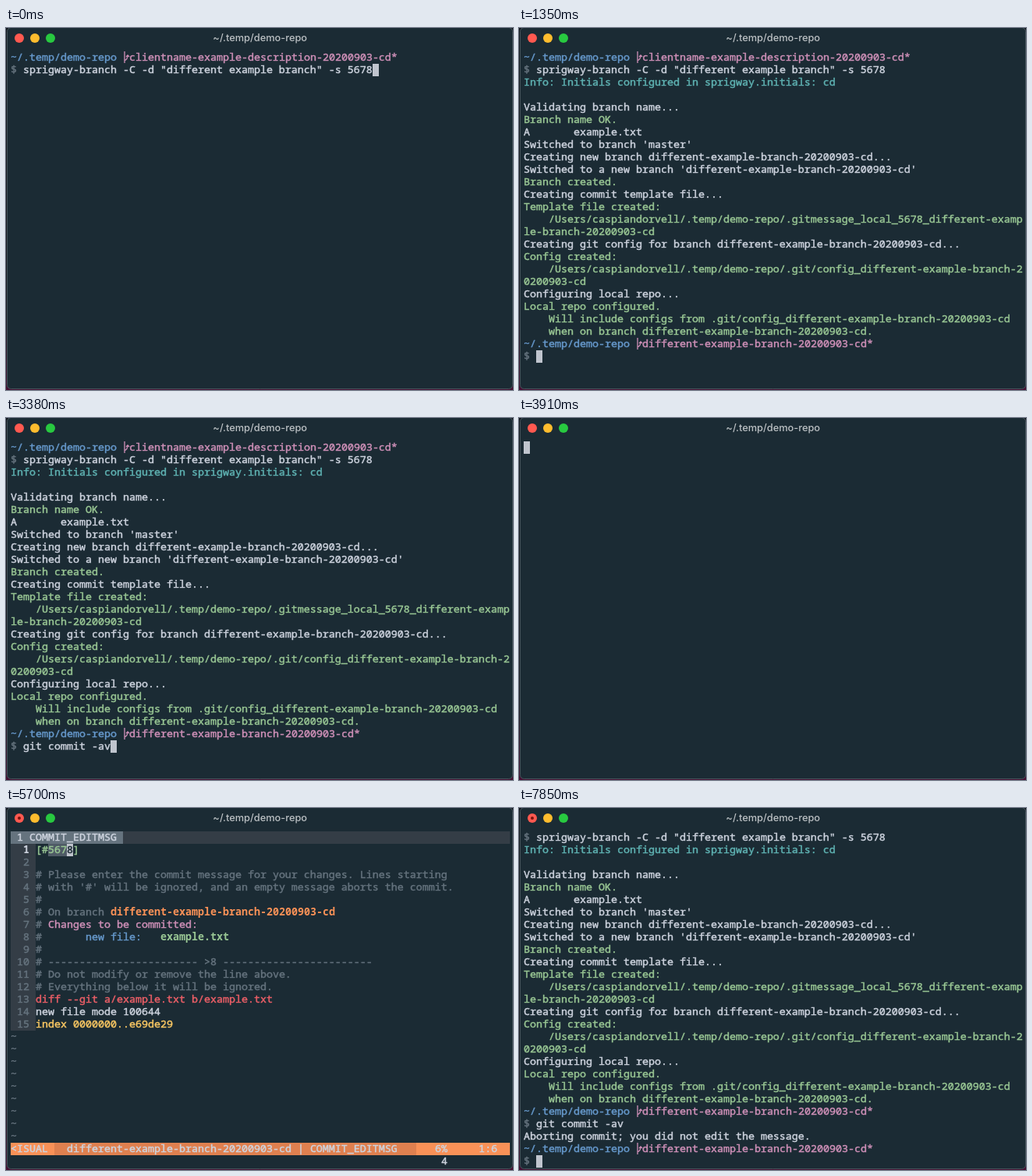
An HTML page with a canvas that plays this animation: 650x465 px, repeating every 8 s.

```html
<!DOCTYPE html>
<html lang="en">
<head>
<meta charset="utf-8">
<title>Terminal</title>
<style>
html, body { margin: 0; width: 100%; height: 100%; overflow: hidden; background: #1b2b34; }
canvas { display: block; }
</style>
</head>
<body>
<canvas id="stage" width="650" height="465"></canvas>
<script>
const ctx = document.getElementById('stage').getContext('2d');
const LOOP = 8000, CELL = 8, ROW = 16, LEFT = 6, TOP = 30;
const BG = '#1b2b34', PANEL = '#343d46', CURSOR = '#c0c5ce';

// Text carries ^x colour codes; a capital letter means bold.
const COLORS = {
  w: '#cdd3de', d: '#65737e', g: '#99c794', c: '#5fb3b3', b: '#6699cc',
  m: '#cf90b8', r: '#ec5f67', o: '#f99157', y: '#fac863', k: BG
};

const branch = 'different-example-branch-20200903-cd';
const home = '/Users/caspiandorvell/.temp/demo-repo/';
const prompt = name => '^b~/.temp/demo-repo ^*' + name + '*';

const output = [
  prompt('clientname-example-description-20200903-cd'),
  '^d$ ^wsprigway-branch -C -d "different example branch" -s 5678',
  '^cInfo: Initials configured in sprigway.initials: cd',
  '',
  'Validating branch name...',
  '^gBranch name OK.',
  'A       example.txt',
  "Switched to branch 'master'",
  `Creating new branch ${branch}...`,
  `Switched to a new branch '${branch}'`,
  '^gBranch created.',
  'Creating commit template file...',
  '^gTemplate file created:',
  `^g    ${home}.gitmessage_local_5678_different-examp`,
  '^gle-branch-20200903-cd',
  `Creating git config for branch ${branch}...`,
  '^gConfig created:',
  `^g    ${home}.git/config_different-example-branch-2`,
  '^g0200903-cd',
  'Configuring local repo...',
  '^gLocal repo configured.',
  `^g    Will include configs from .git/config_${branch}`,
  `^g    when on branch ${branch}.`,
  prompt(branch)
];

const dashes = '-'.repeat(24);
const message = [
  '^g[#5678]',
  '',
  '^d# Please enter the commit message for your changes. Lines starting',
  "^d# with '#' will be ignored, and an empty message aborts the commit.",
  '^d#',
  '^d# On branch ^O' + branch,
  '^d# ^mChanges to be committed:',
  '^d#       ^bnew file:   ^Gexample.txt',
  '^d#',
  `^d# ${dashes} >8 ${dashes}`,
  '^d# Do not modify or remove the line above.',
  '^d# Everything below it will be ignored.',
  '^rdiff --git a/example.txt b/example.txt',
  'new file mode 100644',
  '^yindex 0000000..e69de29'
];

function fill(row, col, cols, color, rows = 1) {
  ctx.fillStyle = color;
  ctx.fillRect(LEFT + col * CELL, TOP + row * ROW, cols * CELL, rows * ROW);
}

function branchIcon(row, col) {
  const x = LEFT + col * CELL, y = TOP + row * ROW;
  ctx.strokeStyle = COLORS.m;
  ctx.lineWidth = 1.3;
  ctx.beginPath();
  ctx.moveTo(x + 2, y);
  ctx.lineTo(x + 2, y + 15);
  ctx.moveTo(x + 2, y + 12);
  ctx.quadraticCurveTo(x + 6, y + 10, x + 6, y + 5);
  ctx.moveTo(x + 4, y + 7);
  ctx.lineTo(x + 6, y + 5);
  ctx.lineTo(x + 8, y + 7);
  ctx.stroke();
}

function put(row, col, text) {
  ctx.textAlign = 'left';
  for (const part of (text[0] === '^' ? text : '^w' + text).split('^').slice(1)) {
    let code = part[0];
    const run = part.slice(1);
    if (code === '*') {
      branchIcon(row, col++);
      code = 'm';
    }
    const bold = code !== code.toLowerCase();
    const x = LEFT + col * CELL, y = TOP + row * ROW + 12;
    ctx.font = `${bold ? 700 : 400} 13.3333px "Noto Sans Mono", "DejaVu Sans Mono", monospace`;
    ctx.fillStyle = ctx.strokeStyle = COLORS[code.toLowerCase()];
    ctx.fillText(run, x, y);
    if (!bold) {
      // A hairline outline gives a medium weight.
      ctx.lineWidth = 0.45;
      ctx.strokeText(run, x, y);
    }
    col += run.length;
  }
}

function cursor(row, col, char = '') {
  fill(row, col, 1, CURSOR);
  put(row, col, '^k' + char);
}

function disc(x, y, r, color) {
  ctx.fillStyle = color;
  ctx.beginPath();
  ctx.arc(x, y, r, 0, Math.PI * 2);
  ctx.fill();
}

function drawWindow(edited) {
  const edge = ctx.createLinearGradient(0, 0, 0, 465);
  edge.addColorStop(0, '#10161d');
  edge.addColorStop(0.8, '#16161f');
  edge.addColorStop(1, '#451033');
  ctx.fillStyle = edge;
  ctx.fillRect(0, 0, 650, 465);

  ctx.beginPath();
  ctx.roundRect(1.5, -0.5, 648, 464, 5);
  ctx.fillStyle = BG;
  ctx.fill();
  ctx.strokeStyle = '#46545b';
  ctx.lineWidth = 1;
  ctx.stroke();

  ['#ff5950', '#fdbc2e', '#28c940'].forEach((color, i) => disc(17 + i * 20, 13, 6, color));
  if (edited) disc(17, 13, 2, '#7d130d');

  ctx.font = '500 12.8px Inter, Roboto, sans-serif';
  ctx.textAlign = 'center';
  ctx.fillStyle = '#bcc1c4';
  ctx.fillText('~/.temp/demo-repo', 325.7, 17);
}

// Number of keys pressed when n presses are spread evenly from start to end.
function keys(t, start, end, n) {
  return t < start ? 0 : Math.min(n, 1 + Math.floor((t - start) * (n - 1) / (end - start)));
}

function drawShell(t) {
  const stages = [2, 6, 11, 15, 24];
  const stage = keys(t, 990, 1350, 5);
  const shown = stage ? stages[stage - 1] : 2;
  output.slice(0, shown).forEach((line, i) => put(i, 0, line));
  if (!stage) return cursor(1, 58);
  if (stage < 5) return cursor(shown, 0);

  const typed = keys(t, 2160, 2600, 6) + keys(t, 2770, 3110, 5) +
    (t >= 3290 ? 2 : 0) + (t >= 3380 ? 1 : 0);
  put(24, 0, '^d$ ^w' + 'git commit -av'.slice(0, typed));
  cursor(24, 2 + typed);
}

function drawAborted() {
  const lines = output.slice(1).concat(
    '^d$ ^wgit commit -av',
    'Aborting commit; you did not edit the message.',
    prompt(branch),
    '^d$'
  );
  lines.forEach((line, i) => put(i, 0, line));
  cursor(26, 2);
}

function drawEditor(t) {
  const visual = t >= 5520 && t < 6510;
  const command = t >= 7040;
  const column = t < 5070 ? 1 : t < 5250 ? 2 : t < 5700 ? 3 : 6;

  fill(0, 0, 80, PANEL);
  fill(0, 0, 18, '#65737e');
  put(0, 1, '1 COMMIT_EDITMSG');

  fill(1, 0, 4, PANEL, message.length);
  if (visual) fill(1, 6, column - 2, '#4f5b66');
  else fill(1, 4, 76, PANEL);
  message.forEach((line, i) => {
    put(i + 1, 0, (i ? '^d' : '^W') + String(i + 1).padStart(3));
    put(i + 1, 4, line);
  });
  for (let row = 16; row < 25; row++) put(row, 0, '^d~');

  const [bright, dark] = visual ? ['#f99157', '#df804f'] : ['#6699cc', '#5a88b7'];
  const mode = visual ? '<ISUAL' : command ? '<MMAND' : '<ORMAL';
  fill(25, 0, 80, bright);
  fill(25, 7, 58, dark);
  put(25, 0, mode);
  put(25, 9, branch + ' | COMMIT_EDITMSG');
  put(25, 68, '6%');
  put(25, 75, '1:' + column);

  if (visual) put(26, 69, String(column - 2));
  if (command) {
    const typed = ':' + (t >= 7220 ? 'q' : '') + (t >= 7490 ? '!' : '');
    put(26, 0, typed);
    cursor(26, typed.length);
  } else {
    cursor(1, 3 + column, '[#5678]'[column - 1]);
  }
}

function draw(t) {
  drawWindow(t >= 4810);
  if (t < 3910) drawShell(t);
  else if (t < 4180) cursor(0, 0);
  else if (t < 7850) drawEditor(t);
  else drawAborted();
}

function tick() {
  draw(performance.now() % LOOP);
  requestAnimationFrame(tick);
}
tick();
</script>
</body>
</html>
```
